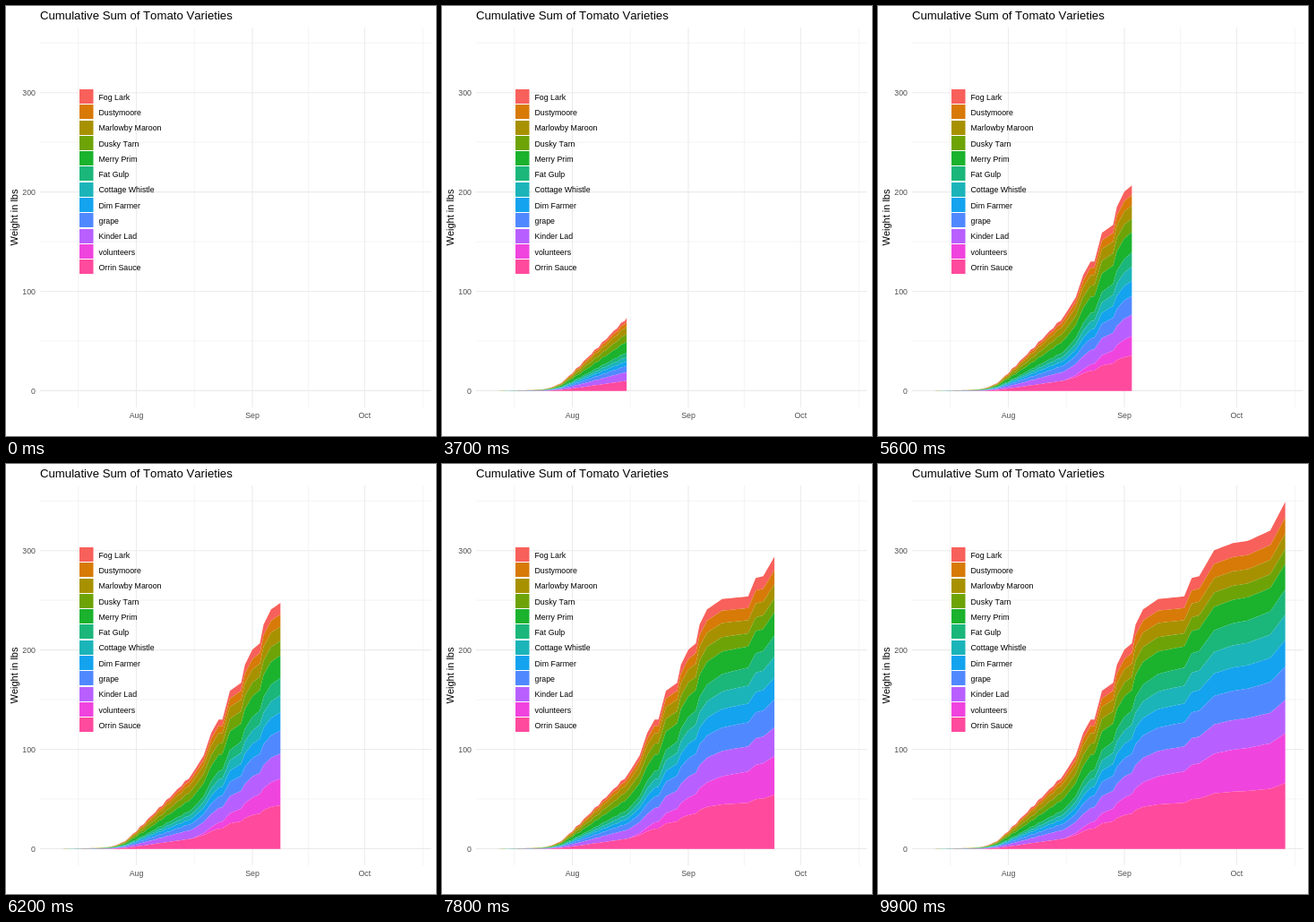
Recreate the animation shown at these times as an HTML page with a canvas. Size 480 px wide and 480 px high, loop 10000 ms.

```html
<!DOCTYPE html>
<html lang="en">
<head>
<meta charset="utf-8">
<title>Cumulative Sum of Tomato Varieties</title>
<style>
html, body { margin: 0; width: 100%; height: 100%; overflow: hidden; background: #fff; }
canvas { display: block; width: 480px; height: 480px; }
</style>
</head>
<body>
<canvas id="chart" width="480" height="480"></canvas>
<script>
const ctx = document.getElementById('chart').getContext('2d');
const FONT = '"Liberation Sans", Arial, sans-serif';
const FRAMES = 100, STEP = 100, LAST_DAY = 95;
const BASE = 429.8, X0 = 57.8, DAY = 4.177;

// Top band first; early and late are percentages of the stack
const varieties = [
  { name: 'Fog Lark', color: '#f8605b', early: 5, late: 4.5 },
  { name: 'Dustymoore', color: '#d77a08', early: 6, late: 4.5 },
  { name: 'Marlowby Maroon', color: '#a89100', early: 10, late: 4.2 },
  { name: 'Dusky Tarn', color: '#6ea308', early: 11, late: 4 },
  { name: 'Merry Prim', color: '#1bb22e', early: 15, late: 6.9 },
  { name: 'Fat Gulp', color: '#1bb67a', early: 6, late: 7.3 },
  { name: 'Cottage Whistle', color: '#1bb4b9', early: 6, late: 7.3 },
  { name: 'Dim Farmer', color: '#14a3ee', early: 6.5, late: 7.6 },
  { name: 'grape', color: '#5089ff', early: 8.5, late: 9.6 },
  { name: 'Kinder Lad', color: '#b860ff', early: 12, late: 9.4 },
  { name: 'volunteers', color: '#f044de', early: 0, late: 14.8 },
  { name: 'Orrin Sauce', color: '#ff4a9d', early: 14, late: 19 }
];

// Main harvest: [day, height of the stack] where the slope changes
const MAIN = 36;
const harvest = [
  [MAIN, 84.5], [39, 104.5], [41, 129.5], [43, 144.5], [44, 144.5],
  [46, 176.5], [49, 185.5], [50, 205.5], [52, 222.5], [54, 229.5],
  [55, 250.5], [57, 267.5], [61, 279], [68, 282], [70, 302.5], [72, 304.5],
  [76, 333.5], [81, 341.5], [85, 344], [91, 355.5], [LAST_DAY, 387.5]
];

const lerp = (a, b, k) => a + (b - a) * k;
const toX = day => X0 + day * DAY;

// Slow start bending into a steady climb with small picking-day steps
function earlyTotal(day) {
  const climb = 6.2 * Math.log(1 + Math.exp((day - 16.5) / 1.5));
  const ripple = day > 17 ? Math.cos((day - 22) / 2.4 * 2 * Math.PI) - 0.7 : 0;
  return 0.1 * day + climb + ripple;
}

function total(day) {
  if (day < MAIN) return earlyTotal(day);
  const i = Math.max(1, harvest.findIndex(p => p[0] >= day));
  const [d0, h0] = harvest[i - 1], [d1, h1] = harvest[i];
  return lerp(h0, h1, (day - d0) / (d1 - d0));
}

// Heights of the band edges, from the top of the stack down to 0
function edges(day) {
  const k = 1 - Math.exp(-Math.max(0, day - MAIN) / 18);
  const parts = varieties.map(v => lerp(v.early, v.late, k));
  const unit = total(day) / parts.reduce((a, b) => a + b);
  let left = total(day);
  return [left, ...parts.map(p => left -= p * unit)];
}

const stacks = Array.from({ length: LAST_DAY + 1 }, (_, day) => edges(day));

// Each day lands on a whole frame; frames in between are interpolated
const frameOf = day => Math.round(day * (FRAMES - 1) / LAST_DAY);
function dayAt(frame) {
  let d = 0;
  while (d < LAST_DAY && frameOf(d + 1) <= frame) d++;
  if (d === LAST_DAY) return d;
  return d + (frame - frameOf(d)) / (frameOf(d + 1) - frameOf(d));
}

function line(x1, y1, x2, y2, width) {
  ctx.lineWidth = width;
  ctx.beginPath();
  ctx.moveTo(x1, y1);
  ctx.lineTo(x2, y2);
  ctx.stroke();
}

function text(str, x, y, size, color, align) {
  ctx.font = size + 'px ' + FONT;
  ctx.fontKerning = 'none';
  ctx.fillStyle = color;
  ctx.textAlign = align;
  ctx.fillText(str, x, y);
}

function drawGrid() {
  const across = (y, w) => line(38, y, 474.5, y, w);
  const down = (x, w) => line(x, 24, x, 448, w);
  ctx.strokeStyle = '#ebebeb';
  for (let i = 0; i < 4; i++) across(373.9 - i * 110.9, 0.6);
  for (const x of [80.6, 210.3, 337.4, 465.3]) down(x, 0.6);
  for (let i = 0; i < 4; i++) across(429.4 - i * 110.9, 1.1);
  for (const x of [145.5, 275, 400.3]) down(x, 1.1);
}

function drawAreas(day) {
  if (day <= 0) return;
  const whole = Math.floor(day), k = day - whole;
  const rows = stacks.slice(0, whole + 1).map((edge, x) => ({ x: toX(x), edge }));
  if (k > 0) {
    const next = stacks[whole + 1];
    rows.push({ x: toX(day), edge: stacks[whole].map((h, i) => lerp(h, next[i], k)) });
  }
  const back = rows.slice().reverse();
  varieties.forEach((v, i) => {
    ctx.fillStyle = v.color;
    ctx.beginPath();
    for (const r of rows) ctx.lineTo(r.x, BASE - r.edge[i]);
    for (const r of back) ctx.lineTo(r.x, BASE - r.edge[i + 1]);
    ctx.fill();
  });
}

function drawLabels() {
  text('Cumulative Sum of Tomato Varieties', 38, 15, 13.2, '#000', 'left');
  for (let i = 0; i < 4; i++) {
    text(String(i * 100), 33, 432.6 - i * 110.9, 8.8, '#4d4d4d', 'right');
  }
  for (const [month, x] of [['Aug', 145.5], ['Sep', 275], ['Oct', 400.3]]) {
    text(month, x, 460, 8.8, '#4d4d4d', 'center');
  }
  ctx.save();
  ctx.translate(13.4, 236);
  ctx.rotate(-Math.PI / 2);
  text('Weight in lbs', 0, 0, 11, '#000', 'center');
  ctx.restore();
}

function drawLegend() {
  varieties.forEach((v, i) => {
    const y = 93 + i * 17.28;
    ctx.fillStyle = v.color;
    ctx.fillRect(82, Math.round(y), 15.5, 16);
    text(v.name, 103.5, y + 11.7, 8.8, '#000', 'left');
  });
}

function draw(now) {
  const frame = Math.floor(now / STEP) % FRAMES;
  ctx.fillStyle = '#fff';
  ctx.fillRect(0, 0, 480, 480);
  drawGrid();
  drawAreas(dayAt(frame));
  drawLabels();
  drawLegend();
}

let start = null;
function tick(now) {
  if (start === null) start = now;
  draw(Math.max(0, now - start));
  requestAnimationFrame(tick);
}
draw(0);
requestAnimationFrame(tick);
</script>
</body>
</html>
```
